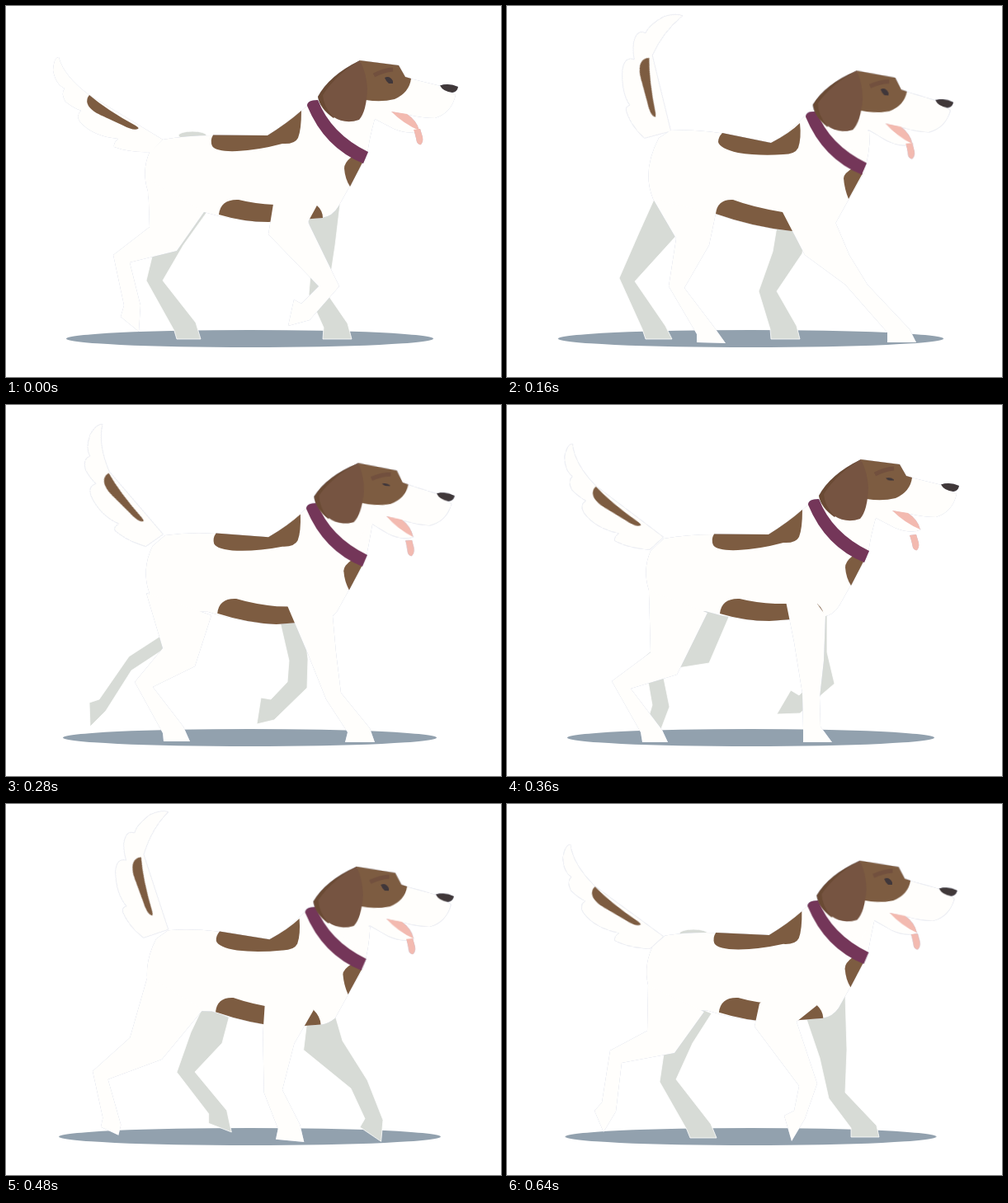
Recreate the animation shown at these times as an HTML page without scripts. Size 600 px wide and 450 px high, loop 680 ms.

```html
<!DOCTYPE html>
<html lang="en">
<head>
<meta charset="utf-8">
<title>Walking dog</title>
<style>
html, body { margin: 0; width: 100%; height: 100%; overflow: hidden; background: #fff }
svg { display: block; width: 100vw; height: 100vh }

/* Held easings: 17 poses of 40 ms; the bob and nod run twice per stride */
:root {
  --bob: linear(0 0% 5.88%, .04 5.88% 11.76%, .27 11.76% 17.64%, .65 17.64% 23.52%, 1 23.52% 29.41%, .97 29.41% 35.29%, .73 35.29% 41.17%, .36 41.17% 47.05%, .08 47.05% 52.94%, 0 52.94% 58.82%, .13 58.82% 64.7%, .42 64.7% 70.58%, .8 70.58% 76.47%, .98 76.47% 82.35%, .87 82.35% 88.23%, .55 88.23% 94.11%, .22 94.11% 100%);
  --nod: linear(0 0% 11.76%, 0 11.76% 17.64%, .25 17.64% 23.52%, .72 23.52% 29.41%, .94 29.41% 35.29%, 1 35.29% 41.17%, .88 41.17% 47.05%, .35 47.05% 52.94%, 0 52.94% 64.7%, .02 64.7% 70.58%, .45 70.58% 76.47%, .87 76.47% 82.35%, 1 82.35% 88.23%, .85 88.23% 94.11%, .47 94.11% 100%);
  --wag: linear(0 0% 5.88%, .27 5.88% 11.76%, .62 11.76% 17.64%, .88 17.64% 23.52%, 1 23.52% 29.41%, .9 29.41% 35.29%, .67 35.29% 41.17%, .4 41.17% 47.05%, .18 47.05% 52.94%, .13 52.94% 58.82%, .45 58.82% 64.7%, .76 64.7% 70.58%, .9 70.58% 76.47%, .9 76.47% 82.35%, .79 82.35% 88.23%, .42 88.23% 94.11%, .11 94.11% 100%);
}
.bob { animation: 680ms var(--bob) infinite }
.wag { animation: 680ms var(--wag) infinite }
.nod { animation: nod 680ms var(--nod) infinite; transform-origin: 430px 66px }
.step { animation: 680ms infinite }

.coat { fill: #fffefc }
.far { fill: #d7dbd6; stroke: #fff; stroke-width: .8 }
.patch { fill: #7d5c41 }
.near { filter: drop-shadow(0 0 .5px #b8c0d8) }

#shadow { fill: #92a1ae; animation-name: spread; transform-origin: 295.5px 404px }
@keyframes spread { to { transform: scaleX(1.05) } }

#hip { animation: hip 680ms step-end infinite }
@keyframes hip { 0% { opacity: 1 } 5.88% { opacity: 0 } 94.11% { opacity: 1 } }

#tail { animation-name: swing; transform-origin: 185px 162px }
@keyframes swing { to { transform: rotate(50deg) } }
#plume { animation-name: curl }
@keyframes curl {
  from { d: path("M190 162L101 108Q70 85 64 62Q58 62 57 78Q60 95 71 100Q66 106 72 116Q82 124 91 127Q84 133 90 141Q105 158 136 161Q130 166 131 171Q150 178 175 177z") }
  to { d: path("M186 145L101 103Q87 73 88 44Q80 48 74 62Q70 82 75 92Q64 97 75 111Q84 120 91 123Q80 129 91 142Q111 161 130 163Q127 168 133 171Q150 178 172 175z") }
}

#body { animation-name: body }
@keyframes body {
  from { d: path("M190 162Q220 157 250 157L317 157Q340 143 370 117L447 137Q440 162 438 180L417 218L403 243Q396 255 383 257L318 262Q275 261 240 250L185 250Q172 245 172 225Q164 200 174 177z") }
  to { d: path("M198 151Q225 149 258 154L320 166Q342 155 364 130L440 152Q440 180 432 204L414 235L398 264Q390 269 383 270L345 273Q295 268 252 252L200 250Q182 240 177 234Q163 200 184 160z") }
}
#saddle { animation-name: saddle }
@keyframes saddle {
  from { d: path("M251 156.500L317 157Q341 142 358 127Q358 150 354 160Q350 168 335 167Q305 175 280 176Q255 177 250 170Q247 163 251 156.500z") }
  to { d: path("M261 154L320 166Q343 154 355 142Q357 160 353 172Q349 180 335 180Q305 182 280 178Q258 173 256 165Q256 159 261 154z") }
}
#belly { animation-name: belly }
@keyframes belly {
  from { d: path("M258 253Q260 234 282 235Q302 240 325 241L376 241Q384 248 384 257L318 262Q288 262 258 253z") }
  to { d: path("M253 252Q255 234 274 235Q298 244 334 250L372 252Q380 260 381 270L345 273Q298 268 253 252z") }
}
#chest { animation-name: chest }
@keyframes chest {
  from { d: path("M419 183L432 190L417 219Q411 210 410 197Q410 190 419 183z") }
  to { d: path("M420 196L431 203L414 234Q409 222 408 209Q408 203 420 196z") }
}
#collar { fill: #743659; animation-name: collar }
@keyframes collar { to { transform: translate(-3px, 13.5px) } }
#head { animation-name: head }
@keyframes head { to { transform: translate(-5px, 12.500px) } }
@keyframes nod { to { transform: rotate(4.3deg) } }

#eye { fill: #40373a; transform-box: fill-box; transform-origin: center; animation: blink 680ms step-end infinite }
@keyframes blink {
  0%, 58.82% { transform: none }
  35.29% { transform: scaleY(.7) }
  41.17% { transform: scaleY(.4) }
  52.94% { transform: scaleY(.45) }
}
#tongue { animation-name: tongue }
@keyframes tongue {
  0%, 100% { transform: translate(0, 0); animation-timing-function: steps(4) }
  23.52% { transform: translate(-1px, 1px); animation-timing-function: steps(3) }
  41.17% { transform: translate(-2px, 6px); animation-timing-function: steps(2) }
  52.94% { transform: translate(-6px, 8px); animation-timing-function: steps(2) }
  64.7% { transform: translate(-1px, -1px); animation-timing-function: steps(3) }
  82.35% { transform: translate(-4px, 7px); animation-timing-function: steps(2) }
  94.11% { transform: translate(0, 3px); animation-timing-function: steps(1) }
}

/* Legs: front edge down to the toe, back edge up to the hip or shoulder */
#near-hind { animation-name: near-hind }
@keyframes near-hind {
  0%, 100% { d: path("M240 250L207 297 150 311 163 363 161 395 139 377 143 363 130 302 174 268 172 210z"); animation-timing-function: steps(2) }
  11.76% { d: path("M243 256L230 290 184 318 217 366 219 395 192 378 195 365 160 315 190 277 174 222z"); animation-timing-function: steps(2) }
  23.52% { d: path("M253 252L245 290 215 342 250 388 265 409 230 408 230 398 196 340 205 282 177 234z"); animation-timing-function: steps(3) }
  41.17% { d: path("M249 255L229 317 178 342 215 390 223 408 191 408 190 398 156 336 190 295 170 228z"); animation-timing-function: steps(2) }
  52.94% { d: path("M243 252L206 327 150 344 188 394 195 409 164 409 162 397 127 335 174 300 172 225z"); animation-timing-function: steps(2) }
  64.7% { d: path("M240 250L190 312 123 342 165 397 170 409 137 409 136 395 100 335 145 285 172 218z"); animation-timing-function: steps(3) }
  82.35% { d: path("M237 248L187 305 125 318 88 374 69 387 71 357 80 352 115 302 161 280 171 190z"); animation-timing-function: steps(2) }
  94.11% { d: path("M239 252L203 302 139 314 132 373 117 398 106 372 115 362 125 299 170 275 171 220z"); animation-timing-function: steps(1) }
}
#far-hind { animation-name: far-hind }
@keyframes far-hind {
  0%, 100% { d: path("M245 248L215 290 190 333 230 384 236 404 207 404 204 394 170 333 178 300 190 220z"); animation-timing-function: steps(4) }
  23.52% { d: path("M215 240L204 280 155 334 192 388 200 404 168 404 164 392 136 330 160 275 178 235z"); animation-timing-function: steps(3) }
  41.17% { d: path("M220 260L190 297 152 322 121 371 102 390 101 361 113 357 149 305 186 281 190 230z"); animation-timing-function: steps(2) }
  52.94% { d: path("M269 257L245 313 188 322 197 366 186 395 171 381 176 364 166 306 195 280 200 220z"); animation-timing-function: steps(2) }
  64.7% { d: path("M277 260L270 290 226 320 264 366 266 395 240 379 242 366 202 319 231 273 241 248z"); animation-timing-function: steps(3) }
  82.35% { d: path("M257 256L246 290 235 335 275 383 288 404 257 404 253 395 217 338 210 285 235 240z"); animation-timing-function: steps(2) }
  94.11% { d: path("M248 254L225 290 205 334 247 388 254 405 222 405 218 395 185 337 190 303 215 240z"); animation-timing-function: steps(1) }
}
#near-front { animation-name: near-front }
@keyframes near-front {
  0%, 100% { d: path("M378 240L366 262 404 340 368 381 342 388 349 356 358 361 379 340 318 277 324 240 350 205z"); animation-timing-function: steps(2) }
  11.76% { d: path("M390 255L400 290 430 334 430 380 416 407 401 380 410 373 408 344 345 293 330 245 350 205z"); animation-timing-function: steps(2) }
  23.52% { d: path("M398 262L415 302 437 338 488 392 496 408 461 408 461 396 410 338 361 302 334 250 350 205z"); animation-timing-function: steps(3) }
  41.17% { d: path("M396 256L400 300 406 349 441 392 447 409 411 409 414 397 388 357 366 302 340 241 350 205z"); animation-timing-function: steps(2) }
  52.94% { d: path("M386 255L384 310 379 355 380 390 394 409 359 409 359 393 358 350 348 288 338 238 350 205z"); animation-timing-function: steps(2) }
  64.7% { d: path("M373 249L357 300 341 347 361 388 367 409 332 409 333 396 318 350 323 290 322 245 350 205z"); animation-timing-function: steps(3) }
  82.35% { d: path("M372 253L334 272 323 346 347 390 350 412 317 402 323 390 302 350 288 260 297 242 350 205z"); animation-timing-function: steps(2) }
  94.11% { d: path("M376 244L351 264 376 339 361 382 345 409 336 378 348 372 354 342 300 270 306 242 350 205z"); animation-timing-function: steps(1) }
}
#far-front { animation-name: far-front }
@keyframes far-front {
  0%, 100% { d: path("M405 240L399 290 390 350 414 385 419 404 384 404 385 390 367 350 372 290 364 250z"); animation-timing-function: steps(4) }
  23.52% { d: path("M362 265L358 300 327 346 351 388 355 404 320 404 319 392 305 346 322 298 328 262z"); animation-timing-function: steps(3) }
  41.17% { d: path("M360 260L366 308 365 343 325 382 304 387 309 355 321 357 341 336 343 310 331 258z"); animation-timing-function: steps(2) }
  52.94% { d: path("M388 250L388 300 397 338 355 374 327 375 344 346 354 352 372 335 350 290 345 250z"); animation-timing-function: steps(2) }
  64.7% { d: path("M392 255L408 292 436 334 442 380 434 412 413 386 422 376 418 346 359 297 368 255z"); animation-timing-function: steps(3) }
  82.35% { d: path("M408 242L408 278 442 337 487 390 496 404 461 404 461 393 418 343 364 301 361 260z"); animation-timing-function: steps(2) }
  94.11% { d: path("M410 232L412 298 410 350 448 390 451 404 417 404 417 393 390 357 379 308 361 255z"); animation-timing-function: steps(1) }
}
</style>
</head>
<body>
<svg viewBox="0 0 600 450">
  <ellipse id="shadow" class="bob" cx="295.5" cy="403.5" rx="222.5" ry="10.5"/>
  <g class="far">
    <ellipse id="hip" cx="226" cy="157" rx="17" ry="5"/>
    <path id="far-hind" class="step"/>
    <path id="far-front" class="step"/>
  </g>
  <g class="near">
    <g id="tail" class="wag">
      <path id="plume" class="wag coat"/>
      <path class="patch" d="M101 108Q122 126 157 145Q162 148 160 149Q155 152 140 144Q118 134 110 130Q95 121 99 111z"/>
    </g>
    <path id="body" class="bob coat"/>
    <g class="patch">
      <path id="saddle" class="bob"/>
      <path id="belly" class="bob"/>
      <path id="chest" class="bob"/>
    </g>
    <path id="near-hind" class="step coat"/>
    <path id="near-front" class="step coat"/>
    <g id="head" class="bob">
      <g class="nod">
        <path class="coat" d="M429 66L476 72 484 86 490 88 527 97 545 108Q540 130 520 136Q505 136 488 132L467 128 502 151Q490 157 470 149L447 137 432 165 384 125z"/>
        <path fill="#f3bab0" d="M467 128L486 131Q498 139 501 151Q482 143 467 128z"/>
        <path id="tongue" class="step" fill="#f3bab0" d="M494 150Q496 155 498 165Q500 169 503 168Q506 165 505 159L502 149z"/>
      </g>
    </g>
    <path id="collar" class="bob" d="M365 121Q365 114 378 114Q394 155 439 177L433 191Q386 172 365 121z"/>
    <g id="head-top" class="bob" style="animation-name:head">
      <g class="nod">
        <path class="patch" d="M429 66L476 72 484 86 491 88Q489 105 471 113Q455 117 436 114z"/>
        <path fill="#6a4a34" d="M429 66Q392 84 378 110Q380 124 397 136L420 110z"/>
        <path fill="#765441" d="M429 66Q400 83 384 108Q385 122 396 134Q411 144 428 138Q437 128 438 100Q437 82 429 66z"/>
        <path fill="none" stroke="#72503e" stroke-width="5" d="M446 84Q457 78 469 77"/>
        <path id="eye" d="M459 87Q465 84 469 91L469 94 464 94Q461 92 459 87z"/>
        <path fill="#403839" d="M526 96.500Q537 93 548 98Q547 104 541 105Q530 104 526 96.500z"/>
      </g>
    </g>
  </g>
</svg>
</body>
</html>
```
